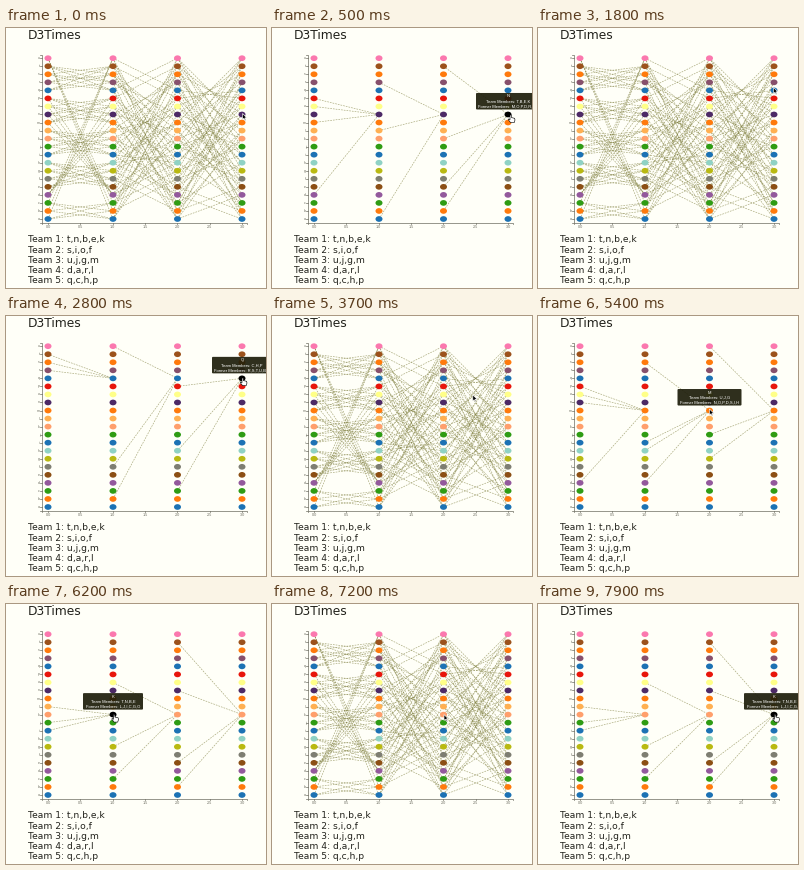
A matplotlib script that plays this animation: 260 px wide and 260 px high, repeating every 8 s.

```python
import numpy as np
import matplotlib.pyplot as plt
from matplotlib.animation import FuncAnimation
from matplotlib.collections import LineCollection
from matplotlib.patches import Ellipse, FancyBboxPatch, Polygon

SIZE, DPI, STEP, LOOP = 260, 100, 100, 8000
PX = 72 / DPI
FADE = 200

PEOPLE = "utsrqponmlkjihgfedcba"
COLORS = ["#fb78ae", "#9c521c", "#ff7a0c", "#87506c", "#1c72b4", "#e8160c",
          "#ffff88", "#4d2a66", "#ff7a0c", "#ffb052", "#ff9f6c", "#2f9c14",
          "#1c72b4", "#8fd2c4", "#b9b912", "#7e7e72", "#8c4f14", "#93599c",
          "#2f9c14", "#ff7a0c", "#1c72b4"]
COLS = [42, 107, 171.5, 236]
ROUNDS = [
    ["qrst", "mnopd", "lkji", "efgh", "abcu"],
    ["cgko", "qubf", "nrla", "tpje", "smihd"],
    ["tnbek", "siof", "ujgm", "darl", "qchp"],
]
# start, end, person, column
HOVERS = [(0, 1100, "n", 3), (1800, 3100, "q", 3), (4300, 5400, "m", 2),
          (5900, 6800, "k", 1), (7600, 9000, "k", 3)]
# time, x, y of the pointer tip
POINTER = np.array([
    (0, 236.5, 85.5), (300, 238, 87), (1100, 238, 87), (1700, 235.5, 59.5),
    (1800, 235.5, 59.5), (2100, 236, 62), (3100, 236, 62), (4200, 171.5, 93),
    (5400, 171.5, 93), (5900, 107.5, 110.5), (6800, 107.5, 110.5),
    (7600, 236.5, 110.5)])
INK, AXIS, LINK = "#22221c", "#6e6e62", (0.50, 0.50, 0.25)


def row_y(person):
    return 30.2 + 8.04 * PEOPLE.index(person)


def mates(person, rnd):
    team = next(t for t in ROUNDS[rnd] if person in t)
    return [p for p in team if p != person]


def hover_level(t, start, end):
    rise = np.clip((t - start) / FADE, 0, 1)
    fall = np.clip((t - end) / FADE, 0, 1)
    return rise * (1 - fall)


fig = plt.figure(figsize=(SIZE / DPI, SIZE / DPI), dpi=DPI, facecolor="#fffff8")
ax = fig.add_axes([0, 0, 1, 1])
ax.set(xlim=(0, SIZE), ylim=(SIZE, 0))
ax.axis("off")


def text(x, y, s, size, **kw):
    kw = {"color": INK, "va": "baseline", "family": "Liberation Sans", **kw}
    return ax.text(x, y, s, fontsize=size * PX, **kw)


def rule(xs, ys):
    ax.plot(xs, ys, color=AXIS, lw=0.7 * PX, zorder=1)


# Captions
text(21.5, 10.8, "D3Times", 12.3, family="DejaVu Sans")
for i, team in enumerate(ROUNDS[-1]):
    text(22, 214.4 + 10.15 * i, f"Team {i + 1}: {','.join(team)}", 9.2,
         family="DejaVu Sans")

# Axes
rule([34.3, 36, 36, 34.3], [26.5, 26.5, 194.8, 194.8])
rule([36, 36, 241, 241], [196.2, 194.8, 194.8, 196.2])
for p in PEOPLE:
    rule([34.3, 36], [row_y(p)] * 2)
    text(33.6, row_y(p), p, 3.6, ha="right", va="center", color=AXIS)
for i in range(7):
    x = COLS[0] + i * (COLS[-1] - COLS[0]) / 6
    rule([x, x], [194.8, 196.2])
    text(x, 200, f"{i / 2:.1f}", 3.8, ha="center", color=AXIS)

# Links run from each team mate to the person one column further on
links = [(rnd, mate, p) for rnd in range(3) for p in PEOPLE
         for mate in mates(p, rnd)]
ends = np.array([p for _, _, p in links])
segments = [[(COLS[r], row_y(a)), (COLS[r + 1], row_y(b))] for r, a, b in links]
lines = LineCollection(segments, linewidths=0.65 * PX,
                       linestyles=[(0, (2.6, 1.6))], zorder=2)
ax.add_collection(lines)

dots = {}
for c, x in enumerate(COLS):
    for p, color in zip(PEOPLE, COLORS):
        dot = Ellipse((x, row_y(p)), 7, 5.7, fc=color, ec="none", zorder=3)
        dots[p, c] = ax.add_patch(dot)


def make_tip(person, col):
    """Tooltip box with three centred lines above a dot."""
    team = mates(person, 2)
    former = [m for m in dict.fromkeys(mates(person, 0) + mates(person, 1))
              if m not in team]
    x, y = COLS[col], row_y(person)
    half = 18 + 2 * len(former)
    box = FancyBboxPatch((x - half + 1, y - 20.5), 2 * half - 2, 14.5,
                         boxstyle="round,pad=1,rounding_size=1",
                         fc="#1d1d0a", ec="none", zorder=5)
    parts = [ax.add_patch(box)]
    rows = [person.upper(),
            "Team Members: " + ",".join(team).upper(),
            "Former Members: " + ",".join(former).upper()]
    for dy, s in zip((-17, -12, -7.2), rows):
        parts.append(text(x, y + dy, s, 4.1, ha="center", color="white", zorder=6))
    return parts


tips = [make_tip(p, c) for _, _, p, c in HOVERS]

ARROW = np.array([(0, 0), (0, 6), (1.4, 4.8), (2.5, 7), (3.4, 6.6),
                  (2.4, 4.4), (4.2, 4.2)])
HAND = np.array([(0, 0), (1.2, 0), (1.5, 2.6), (4.6, 3.3), (5, 5), (4.2, 7.6),
                 (0.6, 7.6), (-1.8, 4.6), (-1.2, 3.9), (0, 4.8)])
cursor = ax.add_patch(Polygon(ARROW, closed=True, lw=0.6 * PX, zorder=8))


def draw(i):
    t = i * STEP
    alpha = np.full(len(links), 0.68)
    hovering = False
    for dot, color in zip(dots.values(), COLORS * len(COLS)):
        dot.set_facecolor(color)
    for (start, end, person, col), tip in zip(HOVERS, tips):
        level = hover_level(t, start, end)
        alpha[ends != person] *= 1 - level
        for part in tip:
            part.set_alpha(level * 0.92 if part is tip[0] else level)
            part.set_visible(level > 0)
        if start < t < end:
            hovering = True
            dots[person, col].set_facecolor("black")
    lines.set_color([(*LINK, a) for a in alpha])

    tip_xy = [np.interp(t, POINTER[:, 0], POINTER[:, k]) for k in (1, 2)]
    cursor.set_xy((HAND if hovering else ARROW) + tip_xy)
    cursor.set_facecolor("white" if hovering else "black")
    cursor.set_edgecolor("black" if hovering else "white")
    return []


anim = FuncAnimation(fig, draw, frames=LOOP // STEP, interval=STEP,
                     repeat=True, repeat_delay=0, blit=False)
plt.show()
```
